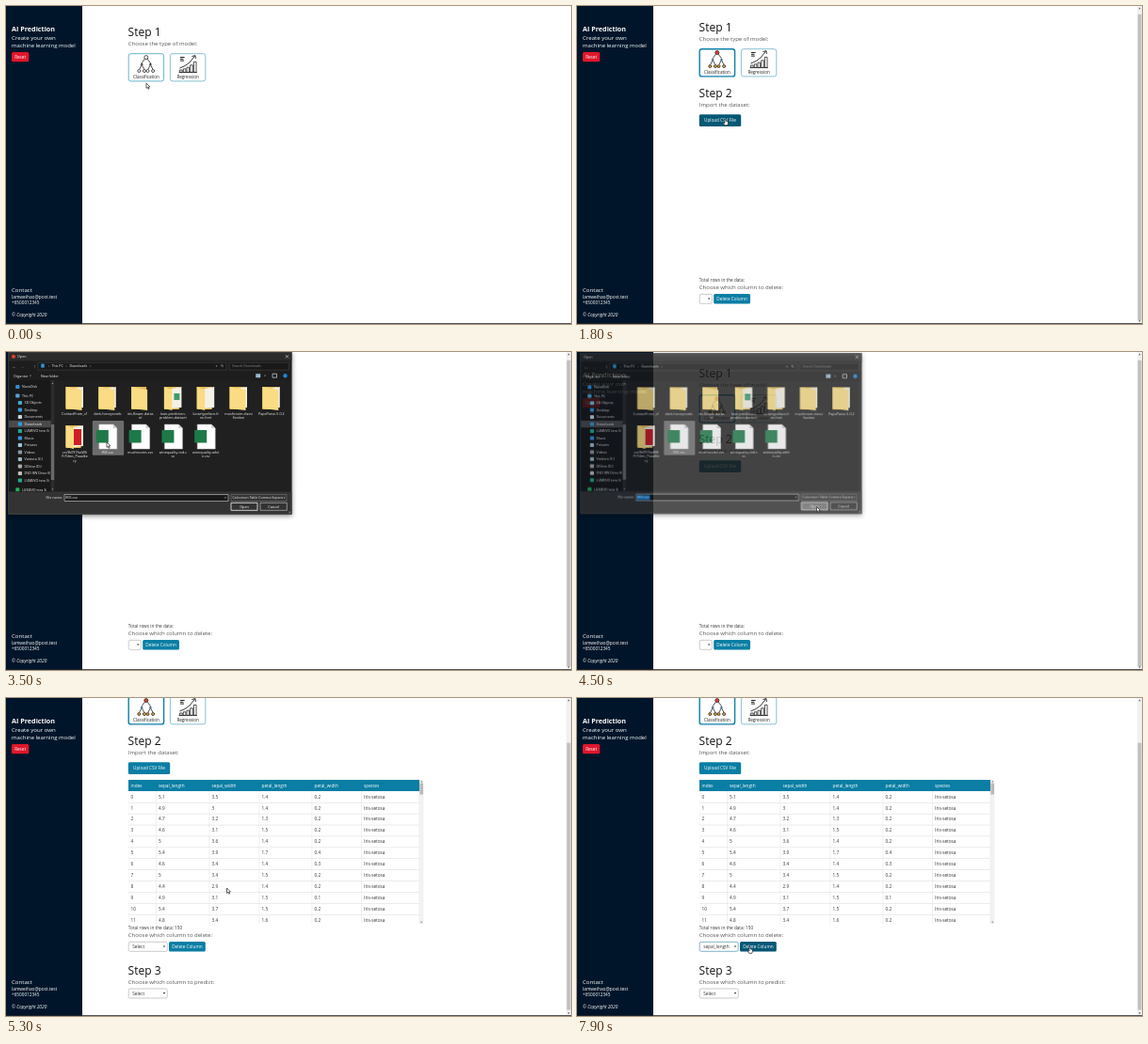
These frames come from a looping animation (600 by 338 pixels, 8 s). An HTML page with a canvas:

```html
<!DOCTYPE html>
<html lang="en">
<head>
<meta charset="utf-8">
<title>AI Prediction</title>
<style>
  html, body { margin: 0; width: 100%; height: 100%; overflow: hidden; background: #fff; }
  canvas { display: block; width: 600px; height: 338px; }
</style>
</head>
<body>
<canvas id="stage" width="600" height="338"></canvas>
<script>
const LOOP = 8000, W = 600, H = 338;
const stage = document.getElementById('stage').getContext('2d');
const dialogLayer = document.createElement('canvas');
dialogLayer.width = W;
dialogLayer.height = H;
const dialogContext = dialogLayer.getContext('2d');
let g = stage;

const TEAL = [10, 126, 164], DARK_TEAL = [4, 88, 118];

// Timing helpers
const ramp = (t, a, b) => Math.min(1, Math.max(0, (t - a) / (b - a)));
const smooth = k => k * k * (3 - 2 * k);
const mix = (a, b, k) => a + (b - a) * k;
const blend = (a, b, k) => `rgb(${a.map((v, i) => Math.round(mix(v, b[i], k)))})`;

// Drawing helpers
function text(str, x, y, size, color = '#333', { align = 'left', style = '' } = {}) {
  g.font = `${style} ${size}px "Open Sans", sans-serif`;
  g.textAlign = align;
  g.fillStyle = color;
  g.fillText(str, x, y + size * 0.34);
}
function rect(x, y, w, h, fill) {
  g.fillStyle = fill;
  g.fillRect(x, y, w, h);
}
function box(x, y, w, h, r, fill, stroke, line = 0.7) {
  g.beginPath();
  g.roundRect(x, y, w, h, r);
  if (fill) { g.fillStyle = fill; g.fill(); }
  if (stroke) { g.strokeStyle = stroke; g.lineWidth = line; g.stroke(); }
}
function path(points, stroke, line = 0.8, fill) {
  g.beginPath();
  points.forEach(([x, y], i) => i ? g.lineTo(x, y) : g.moveTo(x, y));
  if (fill) { g.closePath(); g.fillStyle = fill; g.fill(); }
  if (stroke) { g.strokeStyle = stroke; g.lineWidth = line; g.stroke(); }
}
function dot(x, y, r, fill, stroke) {
  g.beginPath();
  g.arc(x, y, r, 0, 7);
  g.fillStyle = fill;
  g.fill();
  if (stroke) { g.strokeStyle = stroke; g.lineWidth = 0.8; g.stroke(); }
}
function triangle(x, y, r, fill, up = 1) {
  path([[x - r, y - r * 0.6 * up], [x + r, y - r * 0.6 * up], [x, y + r * 0.8 * up]], null, 0, fill);
}
function clipped(x, y, w, h, draw) {
  g.save();
  g.beginPath();
  g.rect(x, y, w, h);
  g.clip();
  draw();
  g.restore();
}

// Page
function sidebar() {
  rect(0, 0, 81, H, '#001529');
  text('AI Prediction', 6, 24.3, 7.2, '#fff', { style: 'bold' });
  text('Create your own', 6, 33.5, 6.1, '#fff');
  text('machine learning model', 6, 42, 6, '#fff');
  box(6, 49, 18.3, 10.3, 1.5, '#e0162b');
  text('Reset', 15.1, 54.3, 4.6, '#fff', { align: 'center' });
  text('Contact', 6, 301.5, 6.1, '#fff');
  text('lamweihao@post.test', 6, 309, 4.8, '#fff');
  text('+6500012345', 6, 315.8, 4.7, '#fff');
  text('© Copyright 2020', 6, 328.5, 4.8, '#fff', { style: 'italic' });
}

function treeIcon(colored) {
  const ink = '#222', pick = c => colored ? c : '#fff';
  for (const side of [-1, 1]) {
    const x = 148.8 + side * 4.6;
    path([[148.8 + side * 1.4, 56.2], [x, 60.6]], ink);
    path([[x - 2.4, 67], [x, 62.4], [x + 2.4, 67]], ink);
    triangle(x, 61.6, 1.7, colored ? '#2b6ea8' : ink, -1);
    dot(x - 2.9, 69, 1.5, pick('#f0a030'), ink);
    dot(x + 2.7, 69, 1.5, pick('#e8b84a'), ink);
  }
  dot(148.8, 54.6, 2, pick('#e8412f'), ink);
}

function chartIcon() {
  const ink = '#222';
  [2.4, 3.6, 5.2, 7.6, 11].forEach((h, i) => box(184.6 + i * 3.7, 70.4 - h, 2.6, h, 0, '#fff', ink, 0.8));
  path([[183.5, 70.6], [203, 70.6]], ink);
  path([[184.5, 66], [190, 63.6], [195, 60], [200.6, 53]], ink, 0.9);
  path([[197.4, 53.6], [201, 52.6], [201.4, 56]], ink, 0.9);
  [4.6, 3.4, 4].forEach((w, i) => rect(185, 54 + i * 1.8, w, 1, ink));
}

function button(label, x, y, w, h, hover) {
  box(x, y, w, h, 1.5, blend(TEAL, DARK_TEAL, hover));
  text(label, x + w / 2, y + h / 2, 4.7, '#fff', { align: 'center' });
}

function select(label, x, y, w, focus) {
  box(x + 0.4, y + 0.4, w - 0.8, 10, 1.6, '#fff', focus ? '#4a93b5' : '#b4b4b4', 0.7);
  text(label, x + 4.4, y + 5.4, 4.7);
  triangle(x + w - 3.6, y + 5.2, 1.2, '#222');
}

const COLUMNS = ['index', 'sepal_length', 'sepal_width', 'petal_length', 'petal_width', 'species'];
const COLUMN_X = [130, 159.5, 216, 269, 325, 377.5, 439];
const ROWS = '5.1 3.5 1.4 .2,4.9 3 1.4 .2,4.7 3.2 1.3 .2,4.6 3.1 1.5 .2,5 3.6 1.4 .2,5.4 3.9 1.7 .4,4.6 3.4 1.4 .3,5 3.4 1.5 .2,4.4 2.9 1.4 .2,4.9 3.1 1.5 .1,5.4 3.7 1.5 .2,4.8 3.4 1.6 .2'
  .split(',').map((row, i) => [i, ...row.split(' ').map(Number), 'Iris-setosa']);

function table() {
  const pitch = 11.91, top = 139;
  clipped(130, top, 314, 153, () => {
    ROWS.forEach((row, i) => {
      const y = 157 + i * pitch;
      row.forEach((cell, c) => text(String(cell), COLUMN_X[c] + 2.6, y, 4.7));
      rect(130, y + pitch / 2, 309, 0.5, '#d4d8dc');
    });
    COLUMN_X.forEach(x => rect(x - 0.3, top, 0.5, 153, '#dfe2e5'));
    rect(130, top, 309, 12, blend(TEAL, TEAL, 0));
    COLUMNS.forEach((name, c) => text(name, COLUMN_X[c] + 2.6, 145.2, 4.7, '#fff'));
    rect(439, top, 4.4, 153, '#f1f1f1');
    rect(439.4, 142.5, 3.6, 12, '#b9b9b9');
    triangle(441.2, 140.7, 1, '#555', -1);
    triangle(441.2, 290.3, 1, '#555');
  });
}

function dropdown(active) {
  const names = ['Select', ...COLUMNS.slice(1), 'index'];
  box(130.3, 321.5, 42, 35.3, 0, '#fff', '#888', 0.5);
  names.forEach((name, i) => {
    const y = 321.7 + i * 5;
    if (i === active) rect(130.5, y, 41.6, 5, '#1e90ff');
    text(name, 133, y + 2.5, 4.4, i === active ? '#fff' : '#222');
  });
}

function page(t) {
  const started = t >= 500, loaded = t >= 4700;
  const scroll = 5 * smooth(ramp(t, 400, 700)) + 47 * smooth(ramp(t, 4600, 5200));
  const chosen = t >= 200;
  rect(0, 0, W, H, '#fff');
  g.save();
  g.translate(0, -scroll);
  text('Step 1', 129.6, 28, 12, '#111');
  text('Choose the type of model:', 129.8, 40, 6, '#555');
  box(130.2, 50.7, 37.4, 29.2, 2.5, '#fff', chosen ? '#0d7fa8' : '#45a3bd', chosen ? 1.4 : 0.8);
  box(174.4, 50.7, 37.4, 29.2, 2.5, '#fff', '#6cb0c8', 0.8);
  treeIcon(started);
  chartIcon();
  text('Classification', 148.9, 75, 4.6, '#222', { align: 'center' });
  text('Regression', 193.1, 75, 4.6, '#222', { align: 'center' });

  if (started) {
    const uploadHover = ramp(t, 1300, 1500) * (1 - ramp(t, 4500, 4700));
    text('Step 2', 129.6, 98, 12, '#111');
    text('Import the dataset:', 129.8, 110, 6, '#555');
    button('Upload CSV File', 129.8, 120.3, 44.4, 12.6, uploadHover);
    text('Total rows in the data:' + (loaded ? ' 150' : ''), 129.8, 296, 4.7);
    text('Choose which column to delete:', 129.8, 304, 6, '#555');
    const width = loaded ? 41.8 : 14;
    const choice = !loaded ? '' : t < 7300 ? 'Select' : 'sepal_length';
    select(choice, 129.8, 310.9, width, t >= 6200);
    button('Delete Column', 131.2 + width, 311, 38.8, 10.4, ramp(t, 7500, 7700));
  }
  if (loaded) {
    table();
    text('Step 3', 129.6, 342, 12, '#111');
    text('Choose which column to predict:', 129.8, 353.6, 6, '#555');
    select('Select', 129.8, 360.6, 41.8, false);
    if (t >= 6200 && t < 7300) dropdown(t < 7100 ? 0 : 1);
  }
  g.restore();

  if (started) {
    const total = loaded ? 393 : 343;
    rect(595, 0, 5, H, '#f1f1f1');
    rect(595.5, 4 + scroll / total * 330, 4, 330 * H / total, '#c1c1c1');
    triangle(597.5, 2.5, 1.1, '#555', -1);
    triangle(597.5, 335, 1.1, '#555');
  }
  sidebar();
  rect(0, 337.2, W, 0.8, '#26292c');
}

// File dialog
const PLACES = [
  ['NuvoDisk', 17, '#2b8fd8', 37], ['This PC', 17, '#4fa8d8', 46.5],
  ...[['3D Objects', '#45a8c8'], ['Desktop', '#3a9ad9'], ['Documents', '#c8d4dc'], ['Downloads', '#2f9be0'],
    ['LUMEVO tera 3i', '#22a890'], ['Music', '#3a8fe0'], ['Pictures', '#9cc4d8'], ['Videos', '#8a98a8'],
    ['Vantora (C:)', '#9ab4c4'], ['DDrive (D:)', '#a8a8a8'], ['DVD RW Drive (E', '#c0c0c0'], ['LUMEVO tera 3i', '#22a890']]
    .map(([name, color], i) => [name, 19.6, color, 54 + i * 7.5]),
  ['LUMEVO tera 3i', 17, '#1fae5c', 146.3],
];
const FILES = [
  ['folder', 'ContactFrom_v1'], ['folder', 'dark-honeycomb'], ['plain', 'iris-flower-datas', 'et'],
  ['green', 'loan-prediction-', 'problem-dataset'], ['paper', 'lunartypeface-fr', 'ee-font'],
  ['folder', 'mushroom-classi', 'fication'], ['folder', 'PapaParse-5.0.2'],
  ['red', 'vcvYk0Y7fasWfi', 'FrTdms_Paaalke', 'ry'], ['csv', 'IRIS.csv'], ['csv', 'mushrooms.csv'],
  ['csv', 'winequality-red.c', 'sv'], ['csv', 'winequality-whit', 'e.csv'],
];

function fileIcon(kind, x, y) {
  if (kind === 'csv') {
    path([[x - 9, y], [x + 6, y], [x + 10, y + 4], [x + 10, y + 26], [x - 9, y + 26]], '#c8c8c8', 0.5, '#fdfdfd');
    path([[x + 6, y], [x + 6, y + 4], [x + 10, y + 4]], null, 0, '#cfcfcf');
    rect(x - 12, y + 6, 13, 13.5, '#1d7a48');
    return;
  }
  rect(x - 9.5, y + 1, 16, 24, '#e3b953');
  if (kind !== 'plain') {
    path([[x - 2, y + 3], [x + 9, y + 1], [x + 9, y + 23], [x - 2, y + 24]], null, 0, '#f4f1e6');
    if (kind === 'green') rect(x + 1, y + 8, 6, 7, '#3f9a68');
    if (kind === 'red') rect(x - 5, y + 5, 12, 17, '#cf1f24');
  }
  const edge = kind === 'plain' || kind === 'folder' ? 7.5 : -1;
  path([[x - 9.5, y + 1], [x + edge, y + 4], [x + edge, y + 26], [x - 9.5, y + 24]], null, 0, '#f9dc83');
}

function files(hovered, selected) {
  FILES.forEach(([kind, ...lines], i) => {
    const x = 73 + (i % 7) * 34.8, y = i < 7 ? 36 : 77;
    if (i === 8 && hovered) box(92.3, 73.6, 32.4, 35.6, 0, selected ? '#6b6b6b' : '#4a4a4a', selected ? '#8a8a8a' : null, 0.6);
    fileIcon(kind, x, y);
    lines.forEach((line, n) => text(line, x, y + 29.3 + n * 4.7, 3.7, '#f2f2f2', { align: 'center' }));
  });
}

function places(ready) {
  rect(3, 30, 49, 118.5, '#191919');
  rect(3, 72.8, 45, 7.4, '#4a4a4a');
  clipped(3, 30, 44, 118.5, () => PLACES.forEach(([name, x, color, y], i) => {
    const drive = i === 6 || i > 9;
    if (ready || i === 5) box(x - 6.8, y - 2, 4.2, 4, 0.8, color);
    else if (drive) rect(x - 6.2, y - 2.4, 3.6, 4.8, '#eee');
    text(name, x, y, 3.6, '#f0f0f0');
  }));
  rect(47.6, 30, 4, 118.5, '#2c2c2c');
  rect(47.8, 77, 3.4, 59, '#6a6a6a');
  triangle(49.5, 33.5, 0.9, '#aaa', -1);
  triangle(49.5, 146, 0.9, '#aaa');
}

function toolbar(ready) {
  rect(3, 9.5, 300, 21, '#1d1d1d');
  box(34, 11.2, 200, 8, 0, '#191919', '#4c4c4c', 0.5);
  box(237, 11.2, 63.5, 8, 0, '#191919', '#4c4c4c', 0.5);
  text('←', 6.5, 15, 4.5, '#ddd');
  text('→', 15, 15, 4.5, '#777');
  text('↑', 29.5, 15, 4.5, '#ddd');
  text('›', 45, 14.8, 4, '#ccc');
  text('This PC   ›   Downloads   ›', 48.5, 15.2, 3.6, '#f0f0f0');
  triangle(223.5, 15, 0.9, '#bbb');
  text('↻', 228, 15, 4, '#ccc');
  text('Search Downloads', 240, 15.2, 3.6, '#858585');
  text('Organise', 8, 25.3, 3.7, '#f0f0f0');
  triangle(26, 25.3, 0.8, '#ccc');
  text('New folder', 37, 25.3, 3.7, '#f0f0f0');
  if (!ready) return;
  rect(37.3, 12.6, 3.4, 4, '#2f9be0');
  box(265.5, 23.4, 4.5, 3.6, 0, '#8fb8d8', '#ccc', 0.4);
  triangle(275, 25.3, 0.8, '#ccc');
  box(283, 23.2, 4.5, 4, 0, null, '#ddd', 0.7);
  dot(296.5, 25.3, 2.2, '#1c84d6');
}

function footer(t, painted) {
  const fields = [[62, 151.5, 174, 7], [239, 151.5, 59, 7], [239, 160.3, 28, 8], [270, 160.3, 28.3, 8]];
  rect(2.5, 148.5, 301, 24, '#333');
  if (!painted) {
    fields.forEach(f => rect(...f, '#fff'));
    rect(43.5, 152, 17, 5.5, '#e8e8e8');
    rect(297.5, 167, 6, 5.5, '#f4f4f4');
    return;
  }
  const over = t >= 4200;
  fields.forEach((f, i) => box(...f, 0, i === 2 && over ? '#777' : i ? '#333' : '#191919', i === 1 ? '#777' : '#d0d0d0', i === 2 ? 1 : 0.6));
  text('File name:', 60, 155, 3.7, '#f0f0f0', { align: 'right' });
  if (t >= 3500) {
    if (t >= 3800) rect(62.8, 152.6, 14, 5, '#1683d8');
    text('IRIS.csv', 63.2, 155, 3.7, '#fff');
  }
  triangle(233, 155, 0.9, '#ccc');
  text('Calcorium Table Comma Separa', 240.6, 155, 3.6, '#f0f0f0');
  triangle(295.6, 155, 0.9, '#ccc');
  text('Open', 253, 164.3, 3.8, '#fff', { align: 'center' });
  text('Cancel', 284.2, 164.3, 3.8, '#fff', { align: 'center' });
  rect(300.5, 169.5, 1.8, 1.8, '#777');
}

function dialog(t) {
  const closing = ramp(t, 4400, 4600);
  const alpha = ramp(t, 2100, 2330) * (1 - closing * closing);
  if (!alpha) return;
  const painted = t >= 2400, ready = t >= 2600;

  g = dialogContext;
  g.clearRect(0, 0, W, H);
  rect(2.5, 0, 301, 172.5, painted ? '#202020' : '#fff');
  rect(2.5, 0, 301, 9.7, painted ? '#2b2b2b' : '#363636');
  if (t < 4500) dot(8, 4.8, 2.1, '#e0402a');
  text('Open', t < 4500 ? 12 : 6, 5, 3.7, '#f2f2f2');
  path([[296.8, 3.2], [300, 6.4]], '#eee', 0.6);
  path([[300, 3.2], [296.8, 6.4]], '#eee', 0.6);
  if (painted) toolbar(ready);
  places(ready);
  if (ready) files(t >= 3300, t >= 3500);
  footer(t, painted);
  box(2.7, 0.2, 300.6, 172, 0, null, '#5a5a5a', 0.5);

  g = stage;
  const scale = 0.97 + 0.03 * alpha;
  g.save();
  g.globalAlpha = alpha;
  g.shadowColor = 'rgba(0,0,0,.45)';
  g.shadowBlur = 5;
  g.shadowOffsetY = 1.5;
  g.translate(153, 86);
  g.scale(scale, scale);
  g.drawImage(dialogLayer, -153, -86);
  g.restore();
}

// Pointer: [time, x, y]
const ROUTE = [
  [0, 149, 82], [300, 150, 65.5], [700, 150, 65.5], [1300, 157.5, 120], [2800, 157.5, 120],
  [3500, 107, 96], [3700, 107, 96], [4300, 254.5, 164.5], [4600, 254.5, 164.5], [5300, 234.5, 202],
  [5500, 204, 245], [6000, 154, 263], [6200, 154, 263], [7000, 152.5, 269], [7100, 152.5, 271],
  [7400, 152.5, 271], [7800, 183.5, 264.5], [8000, 183.5, 264.5],
];
const ARROW = [[0, 0], [0, 5.4], [1.3, 4.3], [2.2, 6.3], [3.1, 5.9], [2.2, 4], [3.9, 3.9]];
const HAND = [[-0.5, 0], [0.5, 0], [0.7, 2.3], [3, 3], [3, 5], [2.2, 6.8], [-0.8, 6.8], [-2.3, 4.3], [-1.6, 3.8], [-0.6, 4.6]];

function pointer(t) {
  const next = Math.max(1, ROUTE.findIndex(p => p[0] > t));
  const [t0, x0, y0] = ROUTE[next - 1], [t1, x1, y1] = ROUTE[next];
  const k = smooth(ramp(t, t0, t1));
  const hand = (t >= 200 && t < 800) || (t >= 1300 && t < 2100) || t >= 7700;
  g.save();
  g.translate(mix(x0, x1, k), mix(y0, y1, k));
  g.lineJoin = 'round';
  const shape = hand ? HAND : ARROW;
  path([...shape, shape[0]], '#222', 0.7, '#fff');
  g.restore();
}

function frame(now) {
  const t = Math.floor((now % LOOP) / 100) * 100;
  g = stage;
  page(t);
  dialog(t);
  pointer(t);
  requestAnimationFrame(frame);
}
requestAnimationFrame(frame);
</script>
</body>
</html>
```
